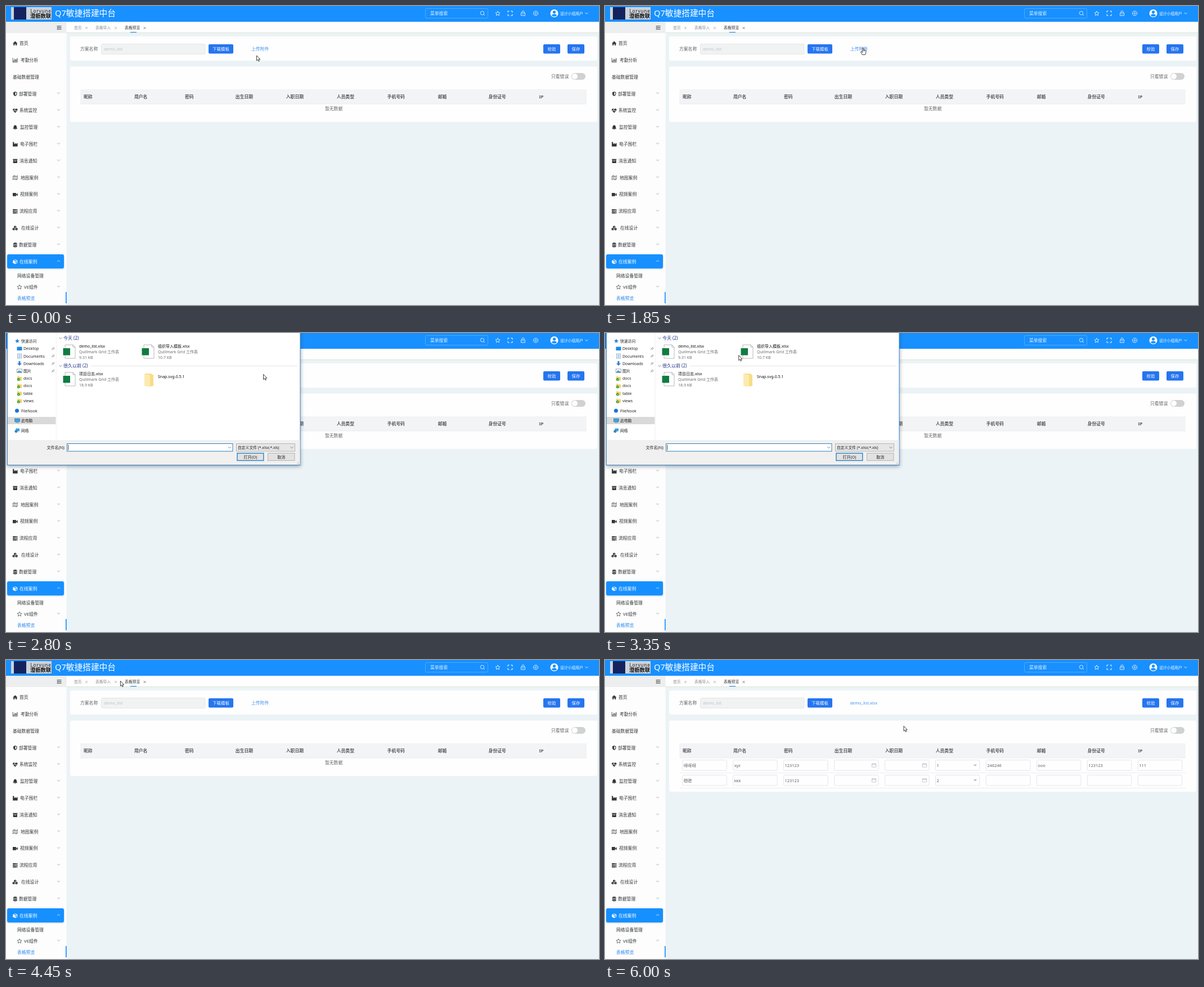
Recreate the animation shown at these times as an HTML page. Size 1054x531 px, loop 6950 ms.

```html
<!DOCTYPE html>
<html lang="zh-CN">
<head>
<meta charset="utf-8">
<title>表格预览</title>
<style>
html, body { margin: 0; width: 100%; height: 100%; overflow: hidden; background: #ecf3f6; }
svg { display: block; width: 100vw; height: 100vh; }
text { font-family: "Noto Sans", "Noto Sans CJK SC", "Noto Sans CJK", sans-serif; white-space: pre; }
</style>
</head>
<body>
<svg id="stage" viewBox="0 0 1054 531"></svg>
<script>
const LOOP = 6950, STEP = 50;
const BLUE = '#1890ff', BTN = '#2575f0', INK = '#333639', GREY = '#606266';
const svg = document.getElementById('stage');

// drawing helpers; text is placed by its vertical centre
const rect = (x, y, w, h, fill, more = '') =>
  `<rect x="${x}" y="${y}" width="${w}" height="${h}" fill="${fill}" ${more}/>`;
const text = (x, y, s, size = 7.8, fill = INK, more = '') =>
  `<text x="${x}" y="${y + size * .37}" font-size="${size}" fill="${fill}" ${more}>${s}</text>`;
const line = (x, y, d, color = INK, w = .8) =>
  `<path transform="translate(${x} ${y})" d="${d}" fill="none" stroke="${color}" stroke-width="${w}"/>`;
const solid = (x, y, d, color = INK) =>
  `<path transform="translate(${x} ${y})" d="${d}" fill="${color}" fill-rule="evenodd"/>`;
const disc = (x, y, r, fill) => `<circle cx="${x}" cy="${y}" r="${r}" fill="${fill}"/>`;
const group = (id, body) => `<g id="${id}">${body}</g>`;
const bold = 'font-weight="700"', mid = 'text-anchor="middle"';

const DOWN = 'M-2.5 -1.2L0 1.2L2.5 -1.2', UP = 'M-2.5 1.2L0 -1.2L2.5 1.2';
const CROSS = 'M-2 -2L2 2M2 -2L-2 2';
const STAR = 'M0 -4L1.2 -1.3L4 -1L1.9 .9L2.5 3.8L0 2.3L-2.5 3.8L-1.9 .9L-4 -1L-1.2 -1.3Z';
const CUBE = 'M0 -4L4 -2.2V2.2L0 4L-4 2.2V-2.2ZM-2.8 -1.9L0 -.7L2.8 -1.9L0 -3ZM.5 .3V2.8L3 1.6V-.8Z';

const menu = [
  ['首页', 24, 'M-4.2 0L0 -4L4.2 0H3V3.6H.9V1H-.9V3.6H-3V0Z'],
  ['考勤分析', 26, 'M-4.5 -4H-3.7V3.2H4.5V4H-4.5ZM-2.8 0H-1.7V2.4H-2.8ZM-.9 -2.5H.2V2.4H-.9ZM1 -1H2.1V2.4H1ZM2.9 -3.5H4V2.4H2.9Z'],
  ['基础数据管理', 12, ''],
  ['部署管理', 23, 'M0 -4L3.2 -2.8V0Q3 3 0 4Q-3 3 -3.2 0V-2.8ZM0 -2.8V2.8Q2 2 2.1 0V-2Z'],
  ['系统监控', 24, 'M0 4L-3.5 .5H-1.8L-.8 -1.2L.5 1.8L1.4 .5H3.5ZM-4.2 -.3Q-4.7 -3.5 -2 -3.5Q-.7 -3.5 0 -2.3Q.7 -3.5 2 -3.5Q4.7 -3.5 4.2 -.3H1L.5 .3L-.8 -2.7L-2.2 -.3Z'],
  ['监控管理', 25, 'M0 -4Q2.8 -3.5 2.8 0Q2.8 1.5 4 2.7H-4Q-2.8 1.5 -2.8 0Q-2.8 -3.5 0 -4ZM-1.2 3.1H1.2Q.8 4.2 0 4.2Q-.8 4.2 -1.2 3.1Z'],
  ['电子围栏', 25, 'M-4.2 -4H-2V-.2L1 -2.2V-.2L4.3 -2.2V4H-4.2Z'],
  ['消息通知', 24, 'M-4 -3.6H4V-1.6H-4ZM-3.6 -1H3.6V3.7H-3.6ZM-1.3 -.3V.5H1.3V-.3Z'],
  ['地图案例', 26, 'M-4.5 -2.8L-1.6 -4L1.6 -2.8L4.5 -4V2.8L1.6 4L-1.6 2.8L-4.5 4ZM-3.9 -2.3V3L-2 2.3V-3ZM-1.2 -3V2.2L1.2 3.1V-2.1ZM2 -2.2V3L3.9 2.3V-3Z'],
  ['视频案例', 25, 'M-4.3 -2.8H1.6V2.8H-4.3ZM2 -.8L4.4 -2.5V2.5L2 .8Z'],
  ['流程应用', 24, 'M-4.2 -3.7H4.2V-1.6H-4.2ZM-4.2 -1H4.2V1.1H-4.2ZM-4.2 1.7H4.2V3.8H-4.2ZM1 -3H3.4V-2.4H1ZM-1 -.3H3.4V.3H-1ZM2 2.4H3.4V3H2Z'],
  ['在线设计', 27, 'M0 -4.3L2.2 -3.2V-1L0 0L-2.2 -1V-3.2ZM-2.5 -.4L-.3 .6V3L-2.5 4L-4.7 3V.6ZM2.5 -.4L4.7 .6V3L2.5 4L.3 3V.6ZM.3 -2.2V-.9L1.5 -1.5V-2.7ZM-2.2 1.9V3.1L-1 2.5V1.3ZM2.8 1.9V3.1L4 2.5V1.3Z'],
  ['数据管理', 23, 'M-3.5 -3.2Q0 -5 3.5 -3.2V-2Q0 -.6 -3.5 -2ZM-3.5 -1.2Q0 .2 3.5 -1.2V.6Q0 2 -3.5 .6ZM-3.5 1.4Q0 2.8 3.5 1.4V3.2Q0 5 -3.5 3.2Z'],
  ['在线案例', 24, CUBE]
];

function header() {
  const w = '#fff';
  return rect(0, 0, 1054, 28, BLUE) +
    rect(9, 2, 72, 22, '#cdd2d8') + rect(14, 2, 22, 22, '#14235e') +
    text(62, 8.5, 'Lorvune', 8.2, '#222', mid + ' letter-spacing=".8"') +
    text(61.5, 17.6, '澄枥数联', 9.3, '#111', mid + ' ' + bold) +
    text(87, 13, 'Q7敏捷搭建中台', 14.7, w) +
    rect(745.5, 4.5, 111, 17, 'none', 'rx="2" stroke="#62b3ff" stroke-width=".8"') +
    text(754, 13, '菜单搜索', 7.8, '#e4f2ff') +
    line(847, 13, 'M2 2L4 4M2.7 -.5A3.2 3.2 0 1 1 -3.7 -.5A3.2 3.2 0 1 1 2.7 -.5', w) +
    line(874, 13, STAR, w) +
    line(896, 13, 'M-4 -1.5V-4H-1.5M1.5 -4H4V-1.5M4 1.5V4H1.5M-1.5 4H-4V1.5', w, 1) +
    line(919, 13, 'M-3.5 -.7H3.5V4H-3.5ZM-2 -.7V-2.5Q-2 -4.3 0 -4.3Q2 -4.3 2 -2.5V-.7M0 1V2.5', w) +
    line(941.5, 13, 'M-1.8 -3.8H1.8L2.6 -2.6L4 -1.6V1.6L2.6 2.6L1.8 3.8H-1.8L-2.6 2.6L-4 1.6V-1.6L-2.6 -2.6ZM1.5 0A1.5 1.5 0 1 1 -1.5 0A1.5 1.5 0 1 1 1.5 0', w) +
    disc(974.5, 13, 7, w) + disc(974.5, 10.8, 2.6, BLUE) +
    solid(974.5, 13, 'M-4.6 4Q-4 1.2 0 1.2Q4 1.2 4.6 4Q0 7.4 -4.6 4Z', BLUE) +
    text(985, 13, '设计小组用户', 6.8, w) + line(1032, 13, DOWN, w);
}

function tabs() {
  const tab = (x, s, close, color) =>
    text(x, 38.5, s, 6.8, color) + line(close, 39, CROSS, color, .6);
  return rect(107, 28, 947, 19, '#fefefe') + rect(107, 47, 947, 1, '#dfe5d3') +
    tab(121, '首页', 143, '#8b9095') + tab(159, '表格导入', 195, '#8b9095') +
    tab(211, '表格预览', 246.5, INK) + rect(221, 46, 11, 1.2, '#3d8bf2');
}

function sidebar() {
  let s = rect(0, 28, 107.5, 503, '#fdfdfd') + rect(0, 28, 107.5, 20, '#eceeef') +
    line(94.5, 38.5, 'M-4 -2.7H4M-1.5 0H4M-4 2.7H4', INK, 1) + solid(94.5, 38.5, 'M-4 0L-2 -1.5V1.5Z') +
    rect(2, 441, 101, 25, BLUE, 'rx="3" filter="url(#soft)"');
  menu.forEach(([name, x, icon], i) => {
    const y = 66.2 + i * 29.82, on = i === 13, color = on ? '#fff' : INK;
    s += solid(16.3, y + .3, icon, color) + text(x, y, name, 7.8, color);
    if (i > 2) s += line(93.5, y - 1, on ? UP : DOWN, on ? '#fff' : '#8b9095', .7);
  });
  return s + text(20, 479, '网络设备管理') +
    line(24, 499, STAR, INK, .7) + text(32, 499, 'VE组件') + line(93.5, 498, DOWN, '#8b9095', .7) +
    text(20, 518.7, '表格预览', 7.8, '#2a88f2') + rect(106, 508, 1.7, 20, BLUE);
}

function form() {
  const button = (x, w, s) => rect(x, 68, w, 16.5, BTN, 'rx="2"') +
    text(x + w / 2, 76.5, s, 7.4, '#fff', mid);
  return rect(114, 54, 937, 43, '#fefefe', 'rx="4"') +
    text(132, 76.3, '方案名称', 7.8, GREY) +
    rect(169.5, 67.5, 184.5, 18, '#f1f2f2', 'rx="2" stroke="#dfe2e6" stroke-width=".8"') +
    text(174, 76.7, 'demo_list', 7.4, '#bfc3ca') +
    button(360, 44, '下载模板') + button(955, 30, '校验') + button(998, 30, '保存') +
    group('upload', text(436, 76.3, '上传附件', 7.8, '#4592f2')) +
    group('uploaded', text(435.5, 76.3, 'demo_list.xlsx', 7.4, '#4592f2'));
}

function table() {
  const heads = ['昵称', '用户名', '密码', '出生日期', '入职日期', '人员类型', '手机号码', '邮箱', '身份证号', 'IP'];
  const rows = [
    ['呀呀呀', 'xyz', '123123', '', '', '1', '246246', 'ooo', '123123', '111'],
    ['嗯嗯', 'kkk', '123123', '', '', '2', '', '', '', '']
  ];
  const cell = (v, i, y) => {
    const x = 137.7 + i * 89.95;
    let s = rect(x, y - 9.3, 78.5, 18.6, '#fefefe', 'rx="2" stroke="#dcdfe6" stroke-width=".8"') +
      text(x + 2, y + .2, v, 7.4, GREY);
    if (i === 3 || i === 4)
      s += line(x + 70.5, y, 'M-3.7 -2.8H3.7V3.2H-3.7ZM-3.7 -1H3.7M-2 -3.8V-2M2 -3.8V-2', '#b0b4ba', .7);
    if (i === 5) s += solid(x + 70.5, y, 'M-3.2 -1.6H3.2L0 1.8Z', '#b8bdc4');
    return s;
  };
  const rule = y => rect(132, y, 900, .8, '#e6e9ee');
  return rect(114, 107.5, 937, 98.5, '#fefefe', 'id="card" rx="4"') +
    text(969, 125, '只看错误', 7.8, GREY) +
    rect(1005, 119, 25, 12, '#d0d1d2', 'rx="6"') + disc(1011, 125, 5, '#fff') +
    rect(132, 148, 900, 26, '#f3f4f5') + rule(173.6) +
    heads.map((h, i) => text(138 + i * 89.95, 161.2, h, 7.8, '#55585e', bold)).join('') +
    group('empty', text(567, 181.7, '暂无数据', 7.8, GREY)) +
    group('rows', rows.map((r, j) => r.map((v, i) => cell(v, i, 187 + j * 26.6)).join('')).join('') +
      rule(200) + rule(227));
}

function files() {
  const entry = (x, y, name, size) =>
    solid(x - 25, y - 1, 'M0 0H14L18 4V24H0Z', '#fff') +
    line(x - 25, y - 1, 'M0 0H14L18 4V24H0ZM14 0V4H18', '#9a9a9a', .7) +
    rect(x - 28.5, y + 5, 12.5, 12.5, '#107c41') +
    text(x, y + 1.5, name, 7, '#111') +
    text(x, y + 11.5, 'Quillmark Grid 工作表', 7, '#6d6d6d') +
    text(x, y + 21.5, size, 7, '#6d6d6d');
  const title = (y, s) => line(97, y, DOWN, '#555', .7) + text(102, y, s, 8, '#1e3287');
  return rect(98, 18, 138, 31, '#e5f3ff', 'id="hover"') +
    title(9.3, '今天 (2)') + title(58.3, '很久以前 (2)') + rect(151, 58, 367, .8, '#dedede') +
    entry(130, 22, 'demo_list.xlsx', '9.31 KB') + entry(270, 22, '组织导入模板.xlsx', '10.7 KB') +
    entry(130, 71, '项目日志.xlsx', '18.9 KB') +
    solid(254, 83, 'M-8 -11H4L8 -8V11L2 12L-8 11Z', '#f7dd86') +
    solid(254, 83, 'M-8 -11L2 -8V12L-8 11Z', '#fcebb0') + text(270, 77.5, 'Snap.svg-0.5.1', 7, '#111');
}

function dialog() {
  const nav = ['Desktop', 'Documents', 'Downloads', '图片', 'docs', 'docs', 'table', 'views'];
  const icons = [
    rect(19.5, 24.5, 9, 6.5, '#1c8ae6'),
    rect(20.5, 37, 7, 8, '#fff', 'stroke="#7592a8" stroke-width=".7"') + line(24, 41, 'M-2 -2H2M-2 0H2M-2 2H2', '#5b9bd5'),
    solid(24, 54, 'M-1.5 -4H1.5V0H4L0 4L-4 0H-1.5Z', '#2b7cd3'),
    rect(19.5, 64, 9, 6.5, '#fff', 'stroke="#777" stroke-width=".7"') + solid(24, 67, 'M-4 3L-1 -1L1 1L2 0L4 3Z', '#3b9ad6')
  ];
  let s = rect(2.5, -110, 520.5, 344.5, '#fff', 'stroke="#3a80c0" filter="url(#shade)"') +
    rect(3, 190, 519.5, 44, '#f0f0f0') + rect(88.8, -50, .7, 240, '#ececec') +
    rect(3, 149, 85.5, 13, '#d9d9d9') +
    solid(20, 14, STAR, '#2f86d8') +
    text(27, 14, '快速访问', 6.8, '#222');
  nav.forEach((n, i) => {
    const y = 27.8 + i * 13.2;
    s += text(31, y, n, 7, '#222');
    s += i < 4
      ? icons[i] + line(83.5, y, 'M-2.5 2.5L-.5 .5M-2 -1L1 2M-.8 -.2L1.2 -2.2M.4 1L2.4 -1M.5 -2.7L2.8 -.4', '#777', .7)
      : solid(24, y, 'M-4 -3.5H-1L0 -2.5H4V4H-4Z', '#f5d26b') + disc(22.3, y + 2, 2.5, '#2ca02c') +
        line(22.3, y + 2, 'M-1.2 0L-.3 1L1.3 -1', '#fff', .7);
  });
  const select = (x, w, fill, stroke) => rect(x, 196.5, w, 13.5, fill, `stroke="${stroke}"`) +
    line(x + w - 5.5, 203.3, DOWN, '#555', .7);
  return s + disc(19.5, 138, 3.5, '#1478d4') + text(27, 138, 'FileNook', 7, '#222') +
    rect(15.5, 152, 9, 5.5, '#38a3e6', 'stroke="#3a6f98" stroke-width=".6"') + rect(17, 158.5, 6, .9, '#57788e') +
    text(27, 155.6, '此电脑', 6.8, '#222') +
    rect(17.5, 169.5, 6.5, 5, '#3ca0e4') + disc(18, 174.5, 2.6, '#3b87b8') + text(27, 173, '网络', 6.8, '#222') +
    group('loading', text(305, 14, '正在处理...', 7, '#41557f', mid)) + group('files', files()) +
    text(105, 203, '文件名(N):', 7, '#222', 'text-anchor="end"') +
    select(108.5, 294.5, '#fff', '#2f83bd') + rect(110.5, 198.5, .8, 9.5, '#111') +
    select(409.5, 104, '#e6e6e6', '#b5b5b5') + text(412, 203.2, '自定义文件 (*.xlsx;*.xls)', 6.8, '#222') +
    rect(411, 213.5, 46.8, 13, '#e2e2e2', 'stroke="#1b7bc4" stroke-width="1.3"') + text(434.4, 220, '打开(O)', 7, '#222', mid) +
    rect(465.5, 213.5, 47.5, 13, '#e2e2e2', 'stroke="#b5b5b5"') + text(489.2, 220, '取消', 7, '#222', mid) +
    line(522, 234, 'M-1 -5L-5 -1M-1 -3L-3 -1', '#a8a8a8', .6);
}

svg.innerHTML = `<defs>
  <filter id="soft"><feDropShadow dx="0" dy="1" stdDeviation="1.2" flood-color="#4a90d0" flood-opacity=".5"/></filter>
  <filter id="shade"><feDropShadow dx="0" dy="2" stdDeviation="3" flood-color="#20304a" flood-opacity=".45"/></filter></defs>` +
  rect(0, 0, 1054, 531, '#ecf3f6') + tabs() + sidebar() + header() + form() + table() +
  group('dialog', dialog()) +
  group('cursor',
    `<path id="arrow" d="M0 0V9L2 7.2L3.5 10.3L4.9 9.6L3.5 6.6H6.3Z" fill="#fff" stroke="#111" stroke-width=".8"/>` +
    `<path id="hand" d="M-1 .5Q0 -.7 1 .5V4L2.2 3.8L3.2 4.4L4.3 4.4Q5.2 4.6 5.2 6V9L4 12.5H-1.4L-4 8.2Q-4 6.8 -2.6 7.2L-1 8.6ZM1 4V6.5M2.9 4.5V6.5" fill="#fff" stroke="#111" stroke-width=".8"/>`);

const el = {};
svg.querySelectorAll('[id]').forEach(n => el[n.id] = n);
const show = (id, on) => el[id].setAttribute('display', on ? 'inline' : 'none');
const ramp = (t, a, b) => Math.min(1, Math.max(0, (t - a) / (b - a)));
const ease = u => u * u * (3 - 2 * u);

// pointer stops: time, x, y
const path = [
  [0, 445.5, 88], [100, 445.5, 88], [650, 464.5, 76.2], [1400, 464.5, 76.2], [2000, 457.5, 73.5],
  [2900, 457.5, 73.5], [3500, 197, 33.3], [4300, 197, 33.3], [4900, 238, 58.7], [5700, 531, 117.3], [LOOP, 531, 117.3]
];
function pointer(t) {
  const i = path.findIndex(p => p[0] > t);
  const [t0, x0, y0] = path[i - 1], [t1, x1, y1] = path[i];
  const u = ease(ramp(t, t0, t1));
  return [x0 + (x1 - x0) * u, y0 + (y1 - y0) * u];
}

function draw(t) {
  const [x, y] = pointer(t);
  const open = ramp(t, 2500, 2700) - ramp(t, 4250, 4450);
  const listed = t >= 2750, filled = t >= 4600;
  const scale = .946 + .054 * open;
  const linked = open === 0 && t < 2500 && x > 436 && x < 467 && y > 70 && y < 82;

  show('dialog', open > 0);
  el.dialog.setAttribute('opacity', open);
  el.dialog.setAttribute('transform', `translate(262.5 65) scale(${scale}) translate(-262.5 -65)`);
  show('loading', !listed);
  show('files', listed);
  show('hover', x > 98 && x < 236 && y > 18 && y < 49);

  show('upload', !filled);
  show('uploaded', filled);
  show('empty', !filled);
  show('rows', filled);
  el.card.setAttribute('height', filled ? 126.5 : 98.5);

  el.cursor.setAttribute('transform', `translate(${x} ${y})`);
  show('hand', linked);
  show('arrow', !linked);
}

const start = performance.now();
function tick() {
  const t = Math.max(0, performance.now() - start) % LOOP;
  draw(Math.floor(t / STEP) * STEP);
  requestAnimationFrame(tick);
}
tick();
</script>
</body>
</html>
```
